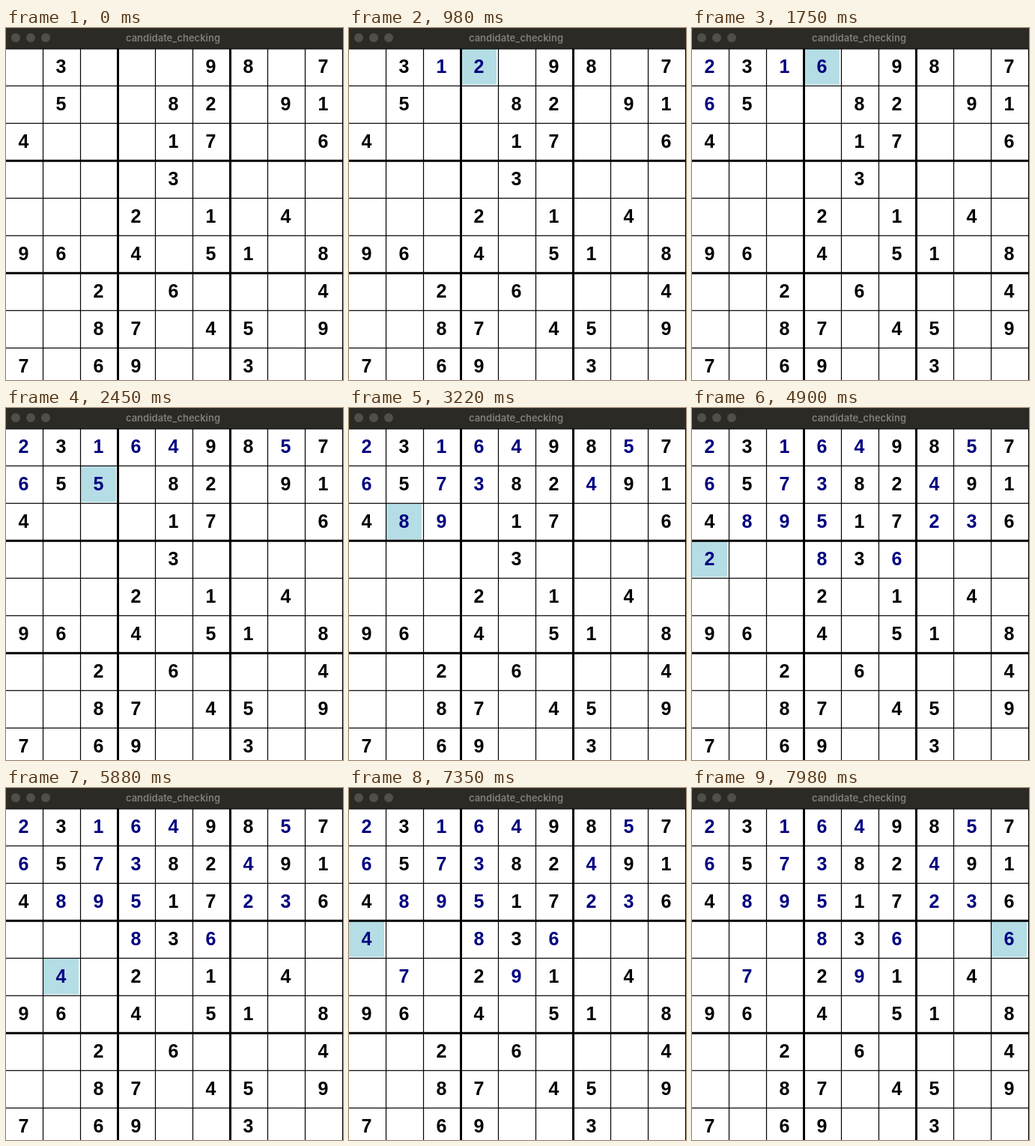
These frames come from a looping animation (450x470 px, 8 s). An HTML page with a canvas:

```html
<!DOCTYPE html>
<html lang="en">
<head>
<meta charset="utf-8">
<title>candidate_checking</title>
<style>
  html, body { margin: 0; width: 100%; height: 100%; overflow: hidden; background: #fff; }
  canvas { display: block; }
</style>
</head>
<body>
<canvas id="stage" width="450" height="470"></canvas>
<script>
const ctx = document.getElementById('stage').getContext('2d');
const LOOP = 8000, TICK = 70, START = 560;
const CELL = 50, TOP = 28;

const clues = [
  '.3...98.7', '.5..82.91', '4...17..6',
  '....3....', '...2.1.4.', '96.4.51.8',
  '..2.6...4', '..87.45.9', '7.69..3..'
].join('').split('').map(c => +c || 0);

// Pace of the search: [time in ms, number of digits tried]
const pace = [
  [560, 3.5], [1750, 78.5], [3220, 170.5], [4900, 272.5],
  [5530, 317.5], [5880, 337.5], [7350, 427.5], [7980, 474.5]
];

function fits(grid, cell, digit) {
  const row = Math.floor(cell / 9), col = cell % 9;
  const boxRow = row - row % 3, boxCol = col - col % 3;
  for (let i = 0; i < 9; i++) {
    const inBox = (boxRow + Math.floor(i / 3)) * 9 + boxCol + i % 3;
    if ([row * 9 + i, i * 9 + col, inBox].some(k => grid[k] === digit)) return false;
  }
  return true;
}

// Try all nine digits in each empty cell; a lone candidate is kept and the scan restarts.
function search(limit) {
  const steps = [];
  let grid = clues;
  let cell = 0;
  while (cell < 81 && steps.length < limit) {
    if (!grid[cell]) {
      const candidates = [];
      for (let digit = 1; digit <= 9; digit++) {
        steps.push({ grid, cell, digit });
        if (fits(grid, cell, digit)) candidates.push(digit);
      }
      if (candidates.length === 1) {
        grid = grid.slice();
        grid[cell] = candidates[0];
        cell = 0;
        continue;
      }
    }
    cell++;
  }
  return steps;
}

const steps = search(490);

function stepAt(time) {
  const i = Math.max(1, pace.findIndex(p => p[0] >= time));
  const [t0, n0] = pace[i - 1], [t1, n1] = pace[i];
  const count = Math.floor(n0 + (n1 - n0) * (time - t0) / (t1 - t0));
  return steps[count - 1];
}

function drawTitleBar() {
  ctx.fillStyle = '#2b2a24';
  ctx.fillRect(0, 0, 450, TOP);
  ctx.fillStyle = '#504f4a';
  for (const x of [13, 33, 53]) {
    ctx.beginPath();
    ctx.arc(x, 13, 6, 0, Math.PI * 2);
    ctx.fill();
  }
  ctx.fillStyle = '#7f7e7a';
  ctx.font = '600 13px Inter, sans-serif';
  ctx.fillText('candidate_checking', 223, 17.5);
}

function drawLines() {
  ctx.fillStyle = '#000';
  for (let i = 1; i <= 9; i++) {
    const width = i % 3 === 0 && i < 9 ? 3 : 1.2;
    const middle = i * CELL - 0.5;
    ctx.fillRect(middle - width / 2, TOP, width, 442);
    ctx.fillRect(0, TOP - 0.2 + middle - width / 2, 450, width);
  }
  ctx.fillRect(0, TOP - 0.5, 450, 1);
}

function drawDigit(cell, digit, color) {
  ctx.fillStyle = color;
  ctx.fillText(digit, cell % 9 * CELL + 23.5, Math.floor(cell / 9) * CELL + 60.3);
}

function draw(time) {
  const step = time < START ? null : stepAt(time);
  const grid = step ? step.grid : clues;

  ctx.fillStyle = '#fff';
  ctx.fillRect(0, 0, 450, 470);
  ctx.textAlign = 'center';
  if (step) {
    ctx.fillStyle = '#b4dde5';
    ctx.fillRect(step.cell % 9 * CELL, Math.floor(step.cell / 9) * CELL + TOP, 47, 47.5);
  }
  drawTitleBar();
  drawLines();

  ctx.font = 'bold 25px "Liberation Sans", Arial, sans-serif';
  grid.forEach((digit, cell) => {
    if (digit) drawDigit(cell, digit, clues[cell] ? '#000' : '#000080');
  });
  if (step) drawDigit(step.cell, step.digit, '#000080');
}

const begin = performance.now();
function frame() {
  const time = (performance.now() - begin) % LOOP;
  draw(Math.floor(time / TICK) * TICK);
  requestAnimationFrame(frame);
}
frame();
</script>
</body>
</html>
```
